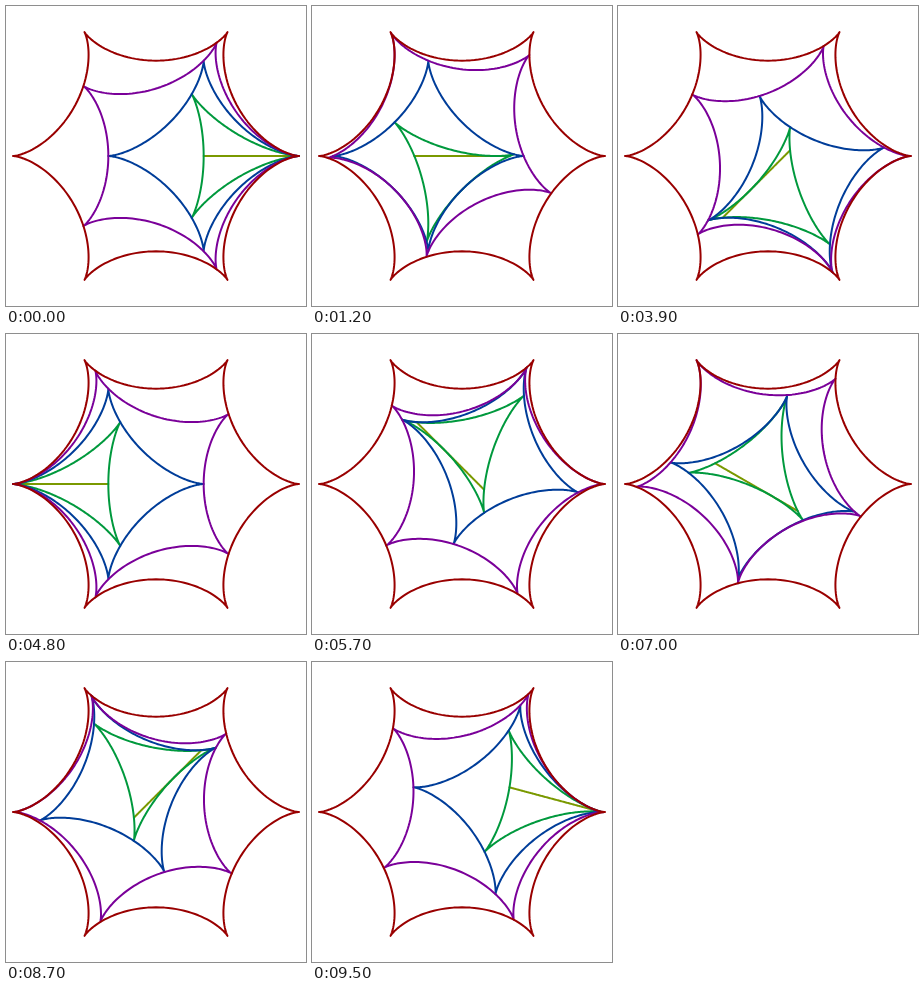
These frames come from a looping animation (300 px wide and 300 px high, 9600 ms). An HTML page with a canvas:

```html
<!DOCTYPE html>
<html lang="en">
<head>
<meta charset="utf-8">
<title>Nested hypocycloids</title>
<style>
html, body { margin: 0; width: 100%; height: 100%; overflow: hidden; background: #fff; }
canvas { display: block; width: 300px; height: 300px; }
</style>
</head>
<body>
<canvas id="stage"></canvas>
<script>
const SIZE = 300, LOOP = 9600, STEP = 100;
const OUTER = 6, UNIT = 143 / OUTER, SAMPLES = 360;
const TAU = 2 * Math.PI;

const canvas = document.getElementById('stage');
const ratio = window.devicePixelRatio || 1;
canvas.width = canvas.height = SIZE * ratio;
const ctx = canvas.getContext('2d');
ctx.scale(ratio, ratio);

function hypocycloid(cusps, cx, cy, turn) {
  ctx.beginPath();
  for (let i = 0; i <= SAMPLES; i++) {
    const a = TAU * i / SAMPLES, b = (cusps - 1) * a;
    const x = cx + UNIT * ((cusps - 1) * Math.cos(a + turn) + Math.cos(turn - b));
    const y = cy + UNIT * ((cusps - 1) * Math.sin(a + turn) + Math.sin(turn - b));
    ctx.lineTo(SIZE / 2 + x, SIZE / 2 - y);
  }
  ctx.strokeStyle = `hsl(${(OUTER - cusps) * -72 + 360}, 100%, 30%)`;
  ctx.stroke();
}

function draw(time) {
  const angle = TAU * (Math.floor(time / STEP) * STEP % LOOP) / LOOP;

  // Each curve rolls inside the next larger one, turning by the same angle.
  const curves = [];
  let x = 0, y = 0, turn = 0;
  for (let cusps = OUTER; cusps >= 2; cusps--) {
    curves.unshift([cusps, x, y, turn]);
    const heading = turn - (cusps - 1) * angle;
    x += UNIT * Math.cos(heading);
    y += UNIT * Math.sin(heading);
    turn += angle;
  }

  ctx.fillStyle = '#fff';
  ctx.fillRect(0, 0, SIZE, SIZE);
  ctx.lineWidth = 2;
  ctx.lineJoin = ctx.lineCap = 'round';
  curves.forEach(curve => hypocycloid(...curve));
}

function tick() {
  draw(performance.now());
  requestAnimationFrame(tick);
}
tick();
</script>
</body>
</html>
```
